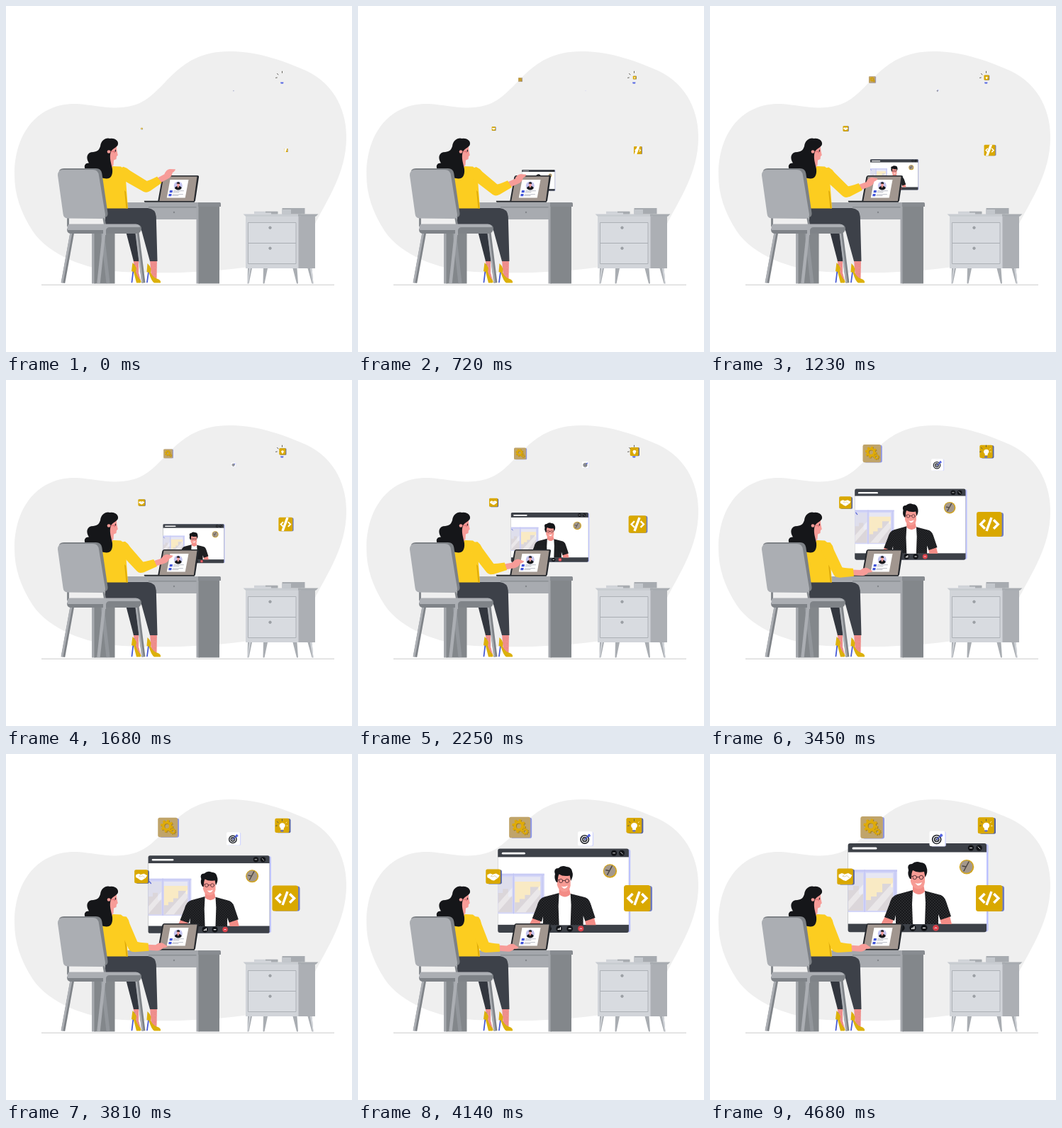
An HTML page for the animation above (5.97 s loop, 488 px wide and 488 px high).

```html
<!DOCTYPE html>
<html lang="en">
<head>
<meta charset="utf-8">
<title>Video call</title>
<style>
html, body { margin: 0; width: 100%; height: 100%; overflow: hidden; background: #fff; }
svg { display: block; width: 100%; height: 100%; }
.line { fill: none; stroke-linecap: round; stroke-linejoin: round; }
</style>
</head>
<body>
<svg viewBox="0 0 488 488">
<defs>
  <pattern id="dots" width="4" height="4" patternUnits="userSpaceOnUse">
    <rect width="4" height="4" fill="#17181b"/>
    <circle cx="1" cy="1" r=".5" fill="#777"/><circle cx="3" cy="3" r=".5" fill="#777"/>
  </pattern>
  <pattern id="net" width="2.4" height="2.4" patternUnits="userSpaceOnUse">
    <rect width="2.4" height="2.4" fill="#f7a5a0"/>
    <path d="M0 0L2.4 2.4M2.4 0L0 2.4" stroke="#df6668" stroke-width=".5"/>
  </pattern>
  <clipPath id="codeClip"><rect id="codeTile" x="375" y="185" width="37.500" height="37" rx="3.500"/></clipPath>
</defs>

<path fill="#efefef" d="M12 238C12 176 48 136 100 138C130 140 150 148 180 140C225 128 235 64 315 64C350 64 385 74 425 92C465 112 481 150 480 188C479 235 455 270 437 305C415 350 385 362 335 369C280 376 220 378 165 375C110 372 60 350 38 318C20 290 12 265 12 238Z"/>
<path d="M50 393.3H463" stroke="#d6d6d6" stroke-width="1.2"/>

<g id="screen">
  <rect x="197" y="127" width="195.500" height="123.500" rx="3" fill="#bcc2ff"/>
  <rect x="194.600" y="126" width="195.400" height="125.200" rx="3" fill="#3d4148"/>
  <rect x="194.600" y="138.500" width="195.400" height="101" fill="#fff"/>
  <path class="line" d="M202 133H234" stroke="#fff" stroke-width="3"/>
  <g fill="#121418"><circle cx="368" cy="132.500" r="4.200"/><circle cx="379.500" cy="132.500" r="4.200"/></g>
  <path class="line" d="M366.500 132.500H369.500M378 131L381 134" stroke="#ddd"/>
  <g>
    <path fill="#d3d5f7" d="M194.600 163H264V223H194.600Z"/>
    <path fill="#dedeec" d="M195 168H216V221H195Z"/>
    <path fill="#f9eac4" d="M220 174H258V221H220Z"/>
    <path fill="#e7e7f3" d="M220 168H258V175H220Z"/>
    <path fill="#dbd6da" d="M195 192H202V186H210V198H216V221H195ZM220 206H227V201H235V195H243V183H255V188H258V221H220Z"/>
    <path fill="#fff" opacity=".4" d="M195 208L216 184V196L195 220ZM222 221L258 181V194L236 221Z"/>
    <path d="M194.600 165H264M218 163V223M261 165V223" stroke="#c2c5f4" stroke-width="1.300"/>
    <path class="line" d="M196.500 168L199 171" stroke="#5562d6" stroke-width="1.500"/>
  </g>
  <circle cx="362" cy="159.300" r="10.300" fill="#d3a51c"/>
  <circle cx="361.700" cy="159" r="8.700" fill="#a4988b"/>
  <path class="line" d="M358 165L365 152M361 159L356 158" stroke="#4b4541" stroke-width="1.500"/>
  <g>
    <path fill="#f38c86" d="M241 240L247 229H260L257 240ZM324 230L338 228L341 240H326Z"/>
    <path fill="#fff" d="M285 193H303V240H285Z"/>
    <path fill="#f38c86" d="M286 184H301L303 194Q295 202 286 194Z"/>
    <path fill="url(#dots)" d="M286 192L264 198Q256 200 253 212L246 230L260 235L262 227V240H286L285 212ZM303 193L322 198Q330 199 333 208L340 229L325 234L322 226V240H303L304 210Z"/>
    <path fill="#f79b94" d="M283 164H303V181Q302 190.500 293 190.500Q285 189 283 180Z"/>
    <path fill="#151619" d="M282 176Q278 170 280 164Q277 155 285 155Q290 150 297 153Q304 153 305.500 160Q308 166 303.500 174L302 166Q292 168 286 164Q284 167 284 176Z"/>
    <g class="line" stroke="#4a2a31" stroke-width=".9"><circle cx="288.700" cy="174" r="2.800"/><circle cx="298" cy="174" r="2.800"/><path d="M291.500 173.500H295.200M283 172.500H286"/></g>
    <path fill="#fff" d="M289 182Q294 184 299 181Q297 186 293 185.500Z"/>
  </g>
  <g fill="#121418"><circle cx="270" cy="245.300" r="4.600"/><circle cx="286" cy="245.300" r="4.600"/><circle cx="302" cy="245.300" r="4.600"/></g>
  <circle cx="318.500" cy="245.300" r="4.300" fill="#d9414a"/>
  <path class="line" d="M284.500 246.500V246M286.200 246.500V245M288 246.500V243.500M300.500 245.300H303.500" stroke="#fff" stroke-width="1.300"/>
  <path class="line" d="M317 245.500Q318.500 244 320 245.500" stroke="#fff"/>
</g>

<g id="gear">
  <rect x="215" y="89" width="31" height="30.500" rx="3" fill="#8d96e4"/>
  <rect x="212.300" y="88" width="31.500" height="31" rx="3" fill="#c0a46a"/>
  <g id="cogs" fill="none" stroke="#9c7c2c" transform="translate(1 .8)">
    <circle cx="226.500" cy="101.300" r="5.800" stroke-width="4"/>
    <circle cx="226.500" cy="101.300" r="8.700" stroke-width="2.600" stroke-dasharray="3.400 3.433"/>
    <circle cx="236" cy="109.500" r="2.800" stroke-width="1.800"/>
    <circle cx="236" cy="109.500" r="4.200" stroke-width="1.300" stroke-dasharray="1.600 1.699"/>
  </g>
  <g fill="none" stroke="#dfab08">
    <circle cx="226.500" cy="101.300" r="5.800" stroke-width="4"/>
    <circle cx="226.500" cy="101.300" r="8.700" stroke-width="2.600" stroke-dasharray="3.400 3.433"/>
    <circle cx="236" cy="109.500" r="2.800" stroke-width="1.800"/>
    <circle cx="236" cy="109.500" r="4.200" stroke-width="1.300" stroke-dasharray="1.600 1.699"/>
  </g>
</g>

<g id="hands">
  <rect x="182" y="162.500" width="21.800" height="22" rx="2.500" fill="#56639f"/>
  <rect x="179.300" y="161.500" width="22.500" height="22.500" rx="2.500" fill="#d9a800"/>
  <path fill="#fff" d="M181.500 170L186 168L190 169.500L195 168L200.500 171L198 175L192 179Q189 179.500 185 176L181.500 174Z"/>
  <path class="line" d="M190 169.500L187 172.500L190 173L193 171.500L197 175" stroke="#d9c482" stroke-width=".8"/>
</g>

<g id="target">
  <rect x="311.500" y="109.500" width="21.300" height="21" rx="2" fill="#d3d7ff"/>
  <rect x="309.500" y="108.800" width="21.800" height="21.200" rx="2" fill="#fff"/>
  <g fill="none" stroke="#24272d" stroke-width="1.700"><circle cx="319.700" cy="120.500" r="6"/><circle cx="319.700" cy="120.500" r="3"/></g>
  <circle cx="319.700" cy="120.500" r="1.200" fill="#24272d"/>
  <path class="line" d="M320 120.500L327 113.500" stroke="#4b59cf" stroke-width="1.400"/>
  <path fill="#5364e3" d="M323.500 115L326 112L327 114L329 115L325.500 117.500Z"/>
</g>

<g id="bulb">
  <rect x="380.500" y="90" width="22.500" height="22.800" rx="2.500" fill="#56639f"/>
  <rect x="377.800" y="89.300" width="23" height="23" rx="2.500" fill="#d9a800"/>
  <path fill="#fff" d="M387 107.500V105Q384.500 103 384.800 100.500Q385.800 97 389.500 96.800Q393.700 97 394.200 100.700Q394.200 103 392 105V107.500Z"/>
  <path class="line" d="M395.500 96.500L396.800 95.500M396.500 101.300H398.200" stroke="#fff0c0"/>
</g>
<path class="line" d="M389.500 92.200V94.200M382.500 95.500L384 96.800M380.500 101.300L382.300 101" stroke="#5d5a54"/>
<path fill="#5364e3" d="M387 107.500H391.500L391 109.500H387.700Z"/>

<g id="code">
  <rect x="378" y="186" width="37" height="36" rx="3.500" fill="#6d7bc6"/>
  <rect x="375" y="185" width="37.500" height="37" rx="3.500" fill="#d9a800"/>
  <path d="M387.500 197L381 203.500L387.500 210M400.300 197L406.800 203.500L400.300 210" fill="none" stroke="#fff" stroke-width="3.600"/>
</g>
<g clip-path="url(#codeClip)"><path d="M397 194L390 213" stroke="#fff" stroke-width="3.500"/></g>

<g id="desk">
  <path fill="#a8abb0" d="M165 283H271V301H165Z"/>
  <path fill="#8b8f94" d="M201 283H271V284.500H201Z"/>
  <circle cx="237" cy="291" r="1.200" fill="#83878c"/>
  <path fill="#a5a8ad" d="M121 318H126V391.500H121ZM268.500 283H273V391.500H268.500Z"/>
  <path fill="#83878b" d="M124.500 318H153.500V391.500H124.500ZM271.500 283H301V391.500H271.500Z"/>
  <path fill="#a4a7ac" d="M160 277H301Q303 277 303 280V283H160Z"/>
  <path fill="#888c91" d="M271 277H301Q303 277 303 280V283H271Z"/>
</g>

<g id="laptop">
  <path fill="#25282d" d="M195 274.800H266V276.800H196Q194 276.500 195 274.800ZM223 239H270Q272.500 239 272 241.500L267 274.500Q266.500 276.500 264 276.500H214L220.300 241.500Q221 239 223 239Z"/>
  <path fill="#a1968f" d="M222.500 240.500H269.500L264.800 275H216.300Z"/>
  <path fill="#fff" d="M231.500 245H257.500L252.700 270.500H226.800Z"/>
  <circle cx="242.800" cy="253.500" r="6" fill="#c3c3ee"/>
  <path fill="#17181c" d="M237.800 257Q238.500 254.500 241.500 254H244.500Q247.500 254.500 247.700 257Q246 259.500 242.500 259.500Q239.500 259.300 237.800 257Z"/>
  <path fill="#f5a09b" d="M241.300 250H244.700V253L242.800 257L241.300 254Z"/>
  <path fill="#17181c" d="M240.800 251Q240.500 248.500 243 248.300Q245.500 248.500 245 251L241.500 250.500Z"/>
  <path fill="#4255d8" d="M231 260H235L234.500 263.300H230.500ZM229.700 265H233.700L233.200 268.300H229.200Z"/>
  <path class="line" d="M236.500 260.700H250.500M236 262.500H244M235.300 265.700H249.500M234.800 267.500H243" stroke="#a5a7b4" stroke-width=".8"/>
</g>

<g id="woman">
  <path fill="url(#net)" d="M179.500 358H187V376L190 387L184 386ZM203 358H213L212.500 386L205 384Z"/>
  <path class="line" d="M180.500 365L177.500 389.500M202 368L199 389.500" stroke="#4659d4" stroke-width="1.800"/>
  <path fill="#dcb10b" d="M178.500 362Q182 365 184 370L183 375Q186 383 190 387Q191.500 390.500 189 390.500H184L180 375L177 374ZM199.500 363Q203 366 204.500 371L204 376Q208 384 214 385Q219 387 218 390.500H209Q205 388 201.500 376L198.500 375Z"/>
  <path fill="#32363e" d="M168 314H187L187.500 360H180Z"/>
  <path fill="#3d4149" d="M140 285H200Q211 286 211.800 297L213.500 360H203L191.500 318Q188 308 178 308H140Z"/>
  <path fill="#fccd20" d="M135 244L150 226L162 226.500Q170 231 169 245L172 285.500H139Z"/>
  <path fill="#dfab0a" d="M167 260L169 262L171.500 285.500H169.500Z"/>
  <path fill="#f79c98" d="M145 201L156 196Q155.500 203 157.800 210.500L156 212L155.500 216L152 217.500L151.500 224Q149 230 146 228Z"/>
  <path fill="#151619" d="M133 198C134 189 141 185 147 187C154 186 160 191 157.500 196.500C154 201 149.500 201 147.500 207C145.500 215 148.500 222 150 230C151 241 146 245 138 243C127 240 112 239 111 228C110 224 113 221 117 221.500C112 214 114 206 123 206C130 205 131 203 133 198Z"/>
  <circle cx="145" cy="205.500" r="2.300" fill="#f79c98"/>
  <path class="line" d="M147.500 205L153 205.500M153 204V207" stroke="#d66268" stroke-width=".8"/>
  <path class="line" d="M154.500 203V205" stroke="#24252b" stroke-width="1.200"/>
</g>

<g id="chair">
  <path d="M93.500 319L80.500 390.500" stroke="#7f8388" stroke-width="5.500"/>
  <path d="M92 319L79 390.500" stroke="#abaeb3" stroke-width="3"/>
  <path d="M185 319L194 390.500" stroke="#7f8388" stroke-width="5"/>
  <path d="M183.500 319L192.500 390.500" stroke="#abaeb3" stroke-width="2.500"/>
  <path d="M136 319L144 391" stroke="#92969b" stroke-width="5"/>
  <path d="M139 312L130.500 391" stroke="#abaeb3" stroke-width="4.500"/>
  <path d="M87.500 297V311M137.500 297L140 311" stroke="#85898e" stroke-width="3"/>
  <path fill="#7f8388" d="M90 308H183Q191 308 191 314Q190 321 184 321H92Q86 321 86 315Z"/>
  <path fill="#abaeb3" d="M90 307.500H183Q189 308 189 312H146Q142 312 141 316H87Q85 309 90 307.500Z"/>
  <path d="M139 308V323" stroke="#abaeb3" stroke-width="4"/>
  <path fill="#7d8186" d="M75 232Q77 229 82 229H127Q134 229 135.300 236L143.500 292Q144 297 140 298L133 300L80 240Z"/>
  <path fill="#abaeb3" d="M73 239Q73 231 80 231H123Q130 231 131 239L140 294Q140.500 300 134 300L87 299.500Q81 299 80.500 293Z"/>
</g>

<g id="upperArm" fill="#fccd20">
  <path d="M-2 -8.500Q3 -10 9 -8.500L40 -7.500Q47 -6 47.500 0Q47 7.500 40 7.800L5 8Q-7 7 -6 -2Z"/>
</g>
<g id="foreArm">
  <path fill="#f79c98" d="M18 -3.500L31 -3.500Q36 -8 41 -6.500L48 -2.500Q47 -.5 42 0Q39 4 34 4.500L18 4.500Z"/>
  <path fill="#fccd20" d="M0 -7.500Q8 -5.500 20.500 -5.500L22 5.500L2 8Q-6 7 -7 0Z"/>
</g>

<g id="cabinet">
  <path fill="#a9adb2" d="M341 370H347L342.500 391.500H340.500ZM363 370H369L364.500 391.500H362.500ZM404.500 370H410.500L412 391.500H410ZM425.500 370H431.500L433.500 391.500H431.500Z"/>
  <path fill="#d3d6db" d="M343 370H345L341.500 391.500H340.500ZM429 370H431.500L433.500 391.500H432.500Z"/>
  <path fill="#acafb4" d="M412 296H436V370H412Z"/>
  <path fill="#d1d4d9" d="M338 296H412.500V370H338Z"/>
  <path fill="#d8dbe0" stroke="#a9adb3" stroke-width=".9" d="M341.500 305.500H409V334.500H341.500ZM341.500 334.500H409V363.500H341.500Z"/>
  <g fill="#a2a6ab" stroke="#85898e" stroke-width=".7"><circle cx="372.500" cy="312.700" r="1.700"/><circle cx="372.500" cy="341.700" r="1.700"/></g>
  <path fill="#c8ccd1" d="M334.500 293.500H416V296.700H338Z"/>
  <path fill="#a7abb0" d="M412 293.500H440.500L437 296.700H412Z"/>
  <path fill="#d0d3d8" d="M350 289.700H382V293.500H350Z"/>
  <path fill="#a7abb0" d="M366 289.700H383.500V293.500H374V291.500H366ZM389.500 285H421.500V293.500H389.500Z"/>
  <path fill="#c3c7cc" d="M389 287H402V293.500H389Z"/>
</g>
</svg>

<script>
const LOOP = 5970, STEP = 30;
const times = [0, 720, 1680, 2790, 3450, 4140, 4680];

// Fixed point of each growing part, then its scale at each time.
const parts = {
  screen: { at: [242.6, 263.8], scale: [.09, .238, .44, .67, .8, .945, 1] },
  gear:   { at: [229, 104],     scale: [0, .18, .41, .66, .81, .95, 1] },
  hands:  { at: [191.6, 173],   scale: [.1, .24, .42, .64, .77, .92, 1] },
  target: { at: [321, 119.5],   scale: [.08, .04, .28, .57, .78, .95, 1] },
  bulb:   { at: [390.3, 101],   scale: [0, .2, .4, .64, .8, .95, 1] },
  code:   { at: [395, 203.5],   scale: [.13, .3, .53, .8, .95, 1, 1] }
};
parts.codeTile = parts.code;

const shoulder = { at: [163, 235], length: 40 };
const upperAngles = [30, 38, 47, 57, 63, 67, 67];
const foreAngles = [-28, -24, -17, -4, 1.5, 4, 4];
const byId = id => document.getElementById(id);

function sample(values, t) {
  const last = times.length - 1;
  if (t >= times[last]) return values[last];
  const i = times.findIndex(time => time > t) - 1;
  let p = (t - times[i]) / (times[i + 1] - times[i]);
  if (i === last - 1) p = 1 - (1 - p) ** 2;
  return values[i] + (values[i + 1] - values[i]) * p;
}

function place(id, x, y, rest) {
  byId(id).setAttribute("transform", `translate(${x} ${y}) ${rest}`);
}

function draw(t) {
  for (const [id, { at: [x, y], scale }] of Object.entries(parts)) {
    place(id, x, y, `scale(${sample(scale, t)}) translate(${-x} ${-y})`);
  }
  const [x, y] = shoulder.at;
  const upper = sample(upperAngles, t);
  const radians = upper * Math.PI / 180;
  place("upperArm", x, y, `rotate(${upper})`);
  place("foreArm", x + shoulder.length * Math.cos(radians),
    y + shoulder.length * Math.sin(radians), `rotate(${sample(foreAngles, t)})`);
}

const start = performance.now();
function tick() {
  const t = (performance.now() - start) % LOOP;
  draw(Math.floor(t / STEP) * STEP);
  requestAnimationFrame(tick);
}
tick();
</script>
</body>
</html>
```
